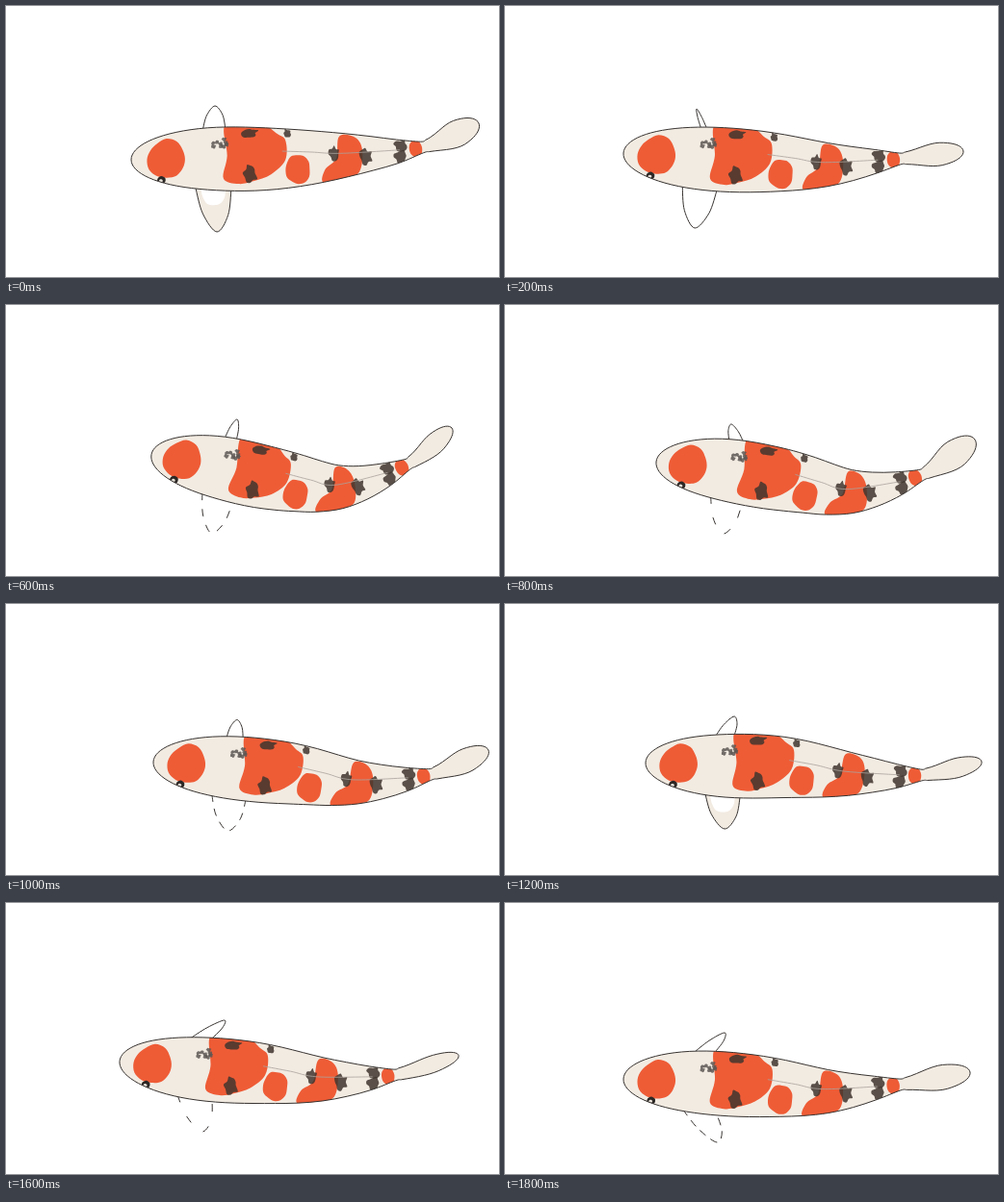
These frames come from a looping animation (512x282 px, 2000 ms). An HTML page with a canvas:

```html
<!DOCTYPE html>
<html lang="en">
<head>
<meta charset="utf-8">
<title>Koi</title>
<style>
html, body { margin: 0; width: 100%; height: 100%; overflow: hidden; background: #fff; }
canvas { display: block; width: 512px; height: 282px; }
</style>
</head>
<body>
<canvas id="stage" width="512" height="282"></canvas>
<script>
const ctx = document.getElementById('stage').getContext('2d');
const STEP = 200;
const CREAM = '#f2ebe2', RED = '#ee5c36', INK = '#373331', DARK = '#40352e';

// x: nose and tail root; y: five even stations of the spine.
// tail: tip and half width; top fin: tip and root width; low fin: tip and gap in its line.
const poses = [
  { x: [130, 432], y: [160, 159, 159, 155, 147], tail: [491, 122, 15], top: [217, 104, 23], low: [219, 235, 0], cream: true },
  { x: [123, 410], y: [153, 158, 162, 165, 159], tail: [476, 151, 13], top: [199, 107, 6], low: [197, 231, 0] },
  { x: [131, 405], y: [148, 165, 181, 184, 155], tail: [445, 116, 7], top: [237, 114, 9], low: [191, 237, 4] },
  { x: [157, 432], y: [163, 171, 183, 194, 177], tail: [488, 140, 16], top: [235, 124, 14], low: [226, 238, 14] },
  { x: [146, 432], y: [165, 168, 170, 177, 178], tail: [495, 164, 11], top: [238, 117, 20], low: [228, 234, 0], cream: true },
  { x: [128, 410], y: [158, 169, 175, 183, 181], tail: [470, 153, 5], top: [240, 121, 24], low: [201, 239, 26] },
  { x: [123, 410], y: [183, 186, 191, 196, 189], tail: [483, 176, 14], top: [228, 135, 21], low: [220, 249, 6] }
];

// Spots live on the body: u runs nose to tail root, v from back (-1) to belly (1).
const saddle = [[.325, -1.1], [.45, -1.1], [.505, -.82], [.533, -.6], [.53, .05],
  [.48, .5], [.42, .7], [.37, .78], [.318, .62], [.33, -.1]];
const rear = [[.72, -.85], [.775, -.85], [.795, -.2], [.78, .9],
  [.72, 1.05], [.655, 1], [.665, .5], [.705, .1]];
const dorsal = [[.52, -.25], [.62, -.2], [.72, -.1], [.92, -.1]];
// u, v, rx, ry
const patches = [[.122, 0, 20.5, 20], [.572, .4, 13, 15.5], [.977, 0, 7, 9]];
const marks = [[.405, -.82, 9, 4.5], [.41, .44, 6.5, 9.5], [.54, -.87, 4, 4], [.7, -.1, 5, 7],
  [.805, .15, 6, 8], [.925, -.45, 7, 5], [.92, .5, 6.5, 6]];

// Halfway pose, shifted and stretched to run from left to right.
function between(a, b, left, right, dy = 0) {
  const p = {};
  for (const k of ['x', 'y', 'tail', 'top', 'low']) p[k] = a[k].map((v, i) => (v + b[k][i]) / 2);
  const nose = p.x[0], scale = (right - left) / (p.tail[0] - nose);
  const fit = x => left + (x - nose) * scale;
  p.x = p.x.map(fit);
  p.y = p.y.map(y => y + dy);
  for (const k of ['tail', 'top', 'low']) {
    p[k][0] = fit(p[k][0]);
    p[k][1] += dy;
  }
  return p;
}

const [p0, p1, p2, p3, p4, p5, p6] = poses;
const cycle = [
  p0, p1, p2, between(p2, p3, 151, 463), p3, between(p3, p4, 153, 501),
  p4, p5, between(p5, p6, 118, 470, -6), p6
];

function random(seed) {
  return () => (seed = (seed * 16807) % 2147483647) / 2147483647;
}

const mix = (a, b, t) => [a[0] + (b[0] - a[0]) * t, a[1] + (b[1] - a[1]) * t];

// Position and unit direction on the spine; the tail covers u from 1 to 2.
function spine(p, u) {
  const pts = p.y.map((y, i) => [p.x[0] + (p.x[1] - p.x[0]) * i / 4, y]);
  pts.push(p.tail);
  pts.unshift(mix(pts[0], pts[1], -1));
  pts.push(mix(pts[5], pts[6], 2));
  const s = u <= 1 ? u * 4 : u + 3;
  const i = Math.min(4, Math.floor(s)), t = s - i;
  const [a, b, c, d] = pts.slice(i, i + 4);
  const pos = [], dir = [];
  for (const k of [0, 1]) {
    const m = (c[k] - a[k]) / 2, n = (d[k] - b[k]) / 2, e = c[k] - b[k];
    const q = 3 * e - 2 * m - n, r = m + n - 2 * e;
    pos[k] = b[k] + t * (m + t * (q + t * r));
    dir[k] = m + t * (2 * q + 3 * t * r);
  }
  const len = Math.hypot(...dir);
  return { pos, dir: dir.map(v => v / len) };
}

function halfWidth(p, u) {
  if (u <= 1) return 81 * Math.sqrt(u) * (1 - u) + 6 * u;
  const s = u - 1, k = Math.min(1, s * 1.5);
  return (6 + (p.tail[2] - 6) * k * k * (3 - 2 * k)) * Math.sqrt(Math.max(0, 1 - s ** 4));
}

function place(p, u, v) {
  const { pos: [x, y], dir: [dx, dy] } = spine(p, u);
  const h = v * halfWidth(p, u);
  return [x - dy * h, y + dx * h];
}

// Smooth curve through the points.
function curve(pts, closed) {
  const n = pts.length;
  const at = i => pts[closed ? (i + n) % n : Math.max(0, Math.min(n - 1, i))];
  const path = new Path2D();
  path.moveTo(...pts[0]);
  for (let i = 0; i < (closed ? n : n - 1); i++) {
    const [a, b, c, d] = [at(i - 1), at(i), at(i + 1), at(i + 2)];
    path.bezierCurveTo(
      b[0] + (c[0] - a[0]) / 6, b[1] + (c[1] - a[1]) / 6,
      c[0] - (d[0] - b[0]) / 6, c[1] - (d[1] - b[1]) / 6, ...c);
  }
  if (closed) path.closePath();
  return path;
}

function outline(p) {
  const back = [], belly = [], n = 36;
  for (let i = 0; i <= n; i++) {
    const u = 1 - Math.cos(Math.PI * i / n);
    back.push(place(p, u, -1));
    if (i > 0 && i < n) belly.unshift(place(p, u, 1));
  }
  return curve([...back, ...belly], true);
}

// Uneven ellipse turned along the spine.
function blob(p, [u, v, rx, ry], rough, seed) {
  const [x, y] = place(p, u, v), [dx, dy] = spine(p, u).dir;
  const rnd = random(seed), pts = [];
  for (let i = 0; i < 12; i++) {
    const a = i * Math.PI / 6, r = 1 + (rnd() - .5) * rough;
    const along = Math.cos(a) * rx * r, across = Math.sin(a) * ry * r;
    pts.push([x + dx * along - dy * across, y + dy * along + dx * across]);
  }
  return curve(pts, true);
}

function fill(path, color) {
  ctx.fillStyle = color;
  ctx.fill(path);
}

function stroke(path, color, width, dash = []) {
  ctx.strokeStyle = color;
  ctx.lineWidth = width;
  ctx.setLineDash(dash);
  ctx.stroke(path);
  ctx.setLineDash([]);
}

// Leaf from root a over the tip to root b.
function fin(a, tip, b, color, gap) {
  const bulge = .24;
  const side = (from, to) => mix(mix(from, tip, .6), mix(to, tip, .6), -bulge * 1.6);
  const path = curve([a, side(a, b), tip.slice(0, 2), side(b, a), b]);
  fill(path, color);
  stroke(path, INK, 1, gap ? [8, gap] : []);
}

function drawFins(p) {
  const spread = p.top[2] / (p.x[1] - p.x[0]) / 2;
  fin(place(p, .285 - spread, -.95), p.top, place(p, .285 + spread, -.95), '#fff');
  fin(place(p, .22, .95), p.low, place(p, .345, .95), p.cream ? CREAM : '#fff', p.low[2]);
  if (p.cream) fill(blob(p, [.283, 1, 13, 16], .1, 5), '#fff');
}

function drawSpots(p) {
  const onBody = ([u, v]) => place(p, u, v);
  ctx.filter = 'blur(0.6px)';
  for (const shape of [saddle, rear]) fill(curve(shape.map(onBody), true), RED);
  patches.forEach((b, i) => fill(blob(p, b, .14, 31 + i * 977), RED));
  ctx.globalAlpha = .85;
  marks.forEach((b, i) => fill(blob(p, b, .6, 71 + i * 7919), DARK));
  const rnd = random(4242);
  for (let k = 0; k < 9; k++) {
    const u = .305 + (rnd() - .5) * .045, v = -.56 + (rnd() - .5) * .35;
    fill(blob(p, [u, v, 2.4, 2], .5, 100 + k * 613), '#5d5753');
  }
  ctx.globalAlpha = 1;
  ctx.filter = 'none';
  stroke(curve(dorsal.map(onBody)), '#aaa39c', .8);
  fill(blob(p, [.103, .9, 4.5, 4], .1, 3), '#2b2725');
  fill(blob(p, [.101, .94, 2, 1.6], .1, 3), '#e8e2da');
}

function draw(p) {
  ctx.fillStyle = '#fff';
  ctx.fillRect(0, 0, 512, 282);
  drawFins(p);
  const body = outline(p);
  fill(body, CREAM);
  ctx.save();
  ctx.clip(body);
  drawSpots(p);
  ctx.restore();
  stroke(body, INK, 1);
}

let shown = -1;
const start = performance.now();
function tick(now) {
  const i = Math.floor(Math.max(0, now - start) / STEP) % cycle.length;
  if (i !== shown) draw(cycle[shown = i]);
  requestAnimationFrame(tick);
}
tick(start);
</script>
</body>
</html>
```
